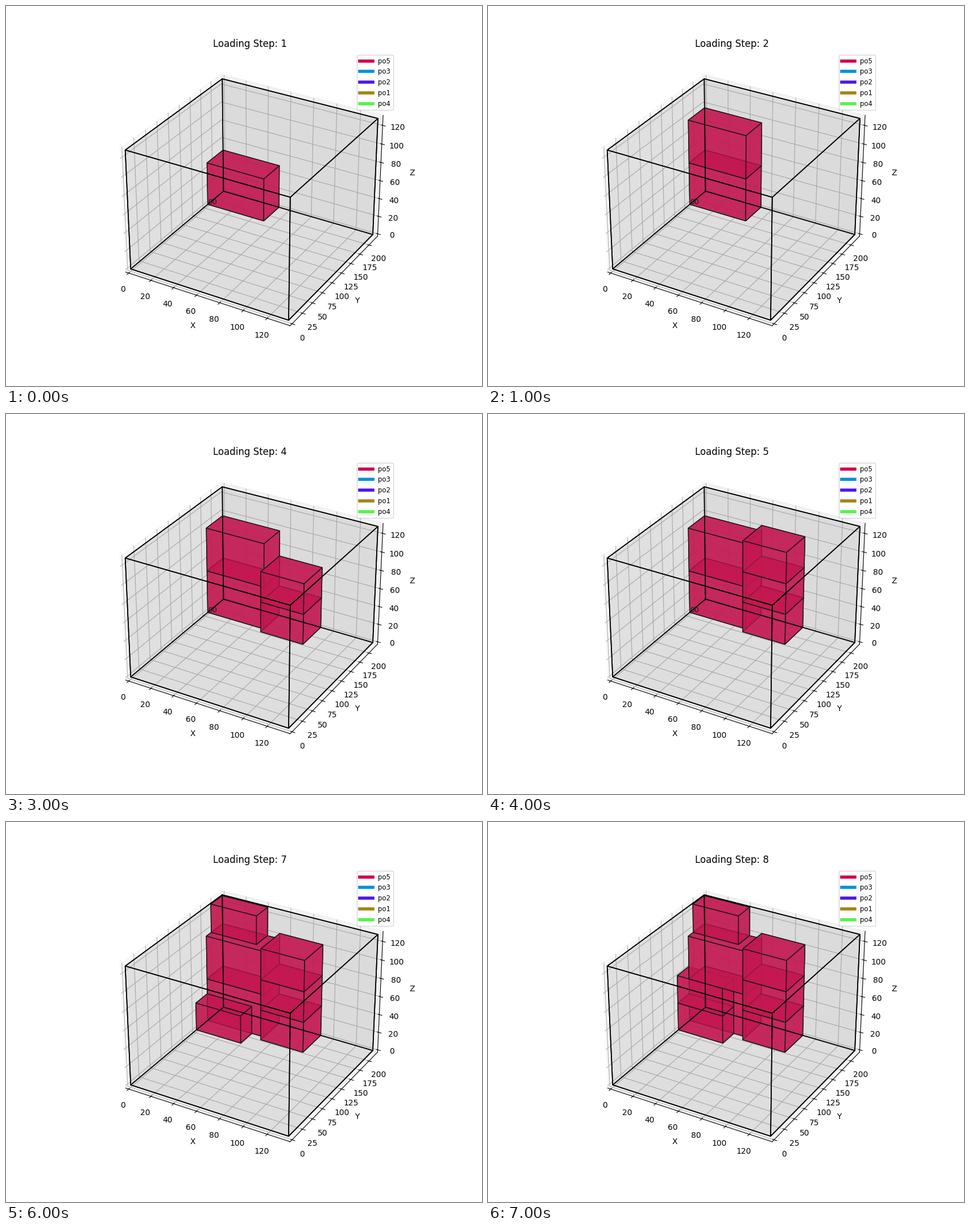
Recreate the animation shown at these times as a matplotlib script. Size 837 by 669 pixels, loop 8000 ms.

```python
import itertools

import matplotlib.pyplot as plt
import numpy as np
from matplotlib.animation import FuncAnimation
from matplotlib.lines import Line2D
from mpl_toolkits.mplot3d.art3d import Poly3DCollection

DPI = 100
WIDTH, HEIGHT = 837, 669
HOLD = (136, 220, 128)
COLORS = {
    "po5": "#d40046",
    "po3": "#0092d4",
    "po2": "#4d1ae2",
    "po1": "#a48416",
    "po4": "#56f250",
}

# (origin, size) in loading order
LARGE, TALL, SMALL = (52, 40, 48), (38, 48, 34), (41, 28, 31)
CARGO = [
    ((0, 180, 0), LARGE),
    ((0, 180, 48), LARGE),
    ((52, 172, 0), TALL),
    ((52, 172, 34), TALL),
    ((52, 172, 68), TALL),
    ((0, 192, 96), SMALL),
    ((0, 152, 0), SMALL),
    ((0, 152, 31), SMALL),
]


def cuboid_faces(origin, size):
    """Return the six quads of an axis-aligned box."""
    origin, size = np.array(origin), np.array(size)
    faces = []
    for axis, side in itertools.product(range(3), (0, 1)):
        quad = []
        for a, b in ((0, 0), (1, 0), (1, 1), (0, 1)):
            corner = np.insert([a, b], axis, side)
            quad.append(origin + corner * size)
        faces.append(quad)
    return faces


# The small surplus keeps the pixel size from being rounded down.
fig = plt.figure(figsize=((WIDTH + 0.01) / DPI, (HEIGHT + 0.01) / DPI), dpi=DPI)
ax = fig.add_subplot(projection="3d")

# Leave a thin margin between the hold and the panes.
for set_lim, length in zip((ax.set_xlim, ax.set_ylim, ax.set_zlim), HOLD):
    set_lim(-length / 48, length * 49 / 48)
ax.set_xlabel("X")
ax.set_ylabel("Y")
ax.set_zlabel("Z")

ax.add_collection3d(Poly3DCollection(
    cuboid_faces((0, 0, 0), HOLD),
    facecolors=(0.5, 0.5, 0.5, 0.1), edgecolors="black", linewidths=1.2))

boxes = []
for origin, size in CARGO:
    box = Poly3DCollection(cuboid_faces(origin, size), facecolors=COLORS["po5"],
                           edgecolors="black", linewidths=1, alpha=0.7)
    ax.add_collection3d(box)
    boxes.append(box)

# The label sits above the farthest box and below all nearer ones.
ax.text(*CARGO[0][0], "00", fontsize=9, zorder=ax.xaxis.get_zorder() + 1.5)

handles = [Line2D([], [], color=c, linewidth=4) for c in COLORS.values()]
ax.legend(handles, list(COLORS), loc="upper right", fontsize="small")


def show_step(step):
    for i, box in enumerate(boxes):
        box.set_visible(i <= step)
    ax.set_title(f"Loading Step: {step + 1}")
    return boxes


anim = FuncAnimation(fig, show_step, frames=len(CARGO), interval=1000,
                     repeat=True, blit=False)
plt.show()
```
